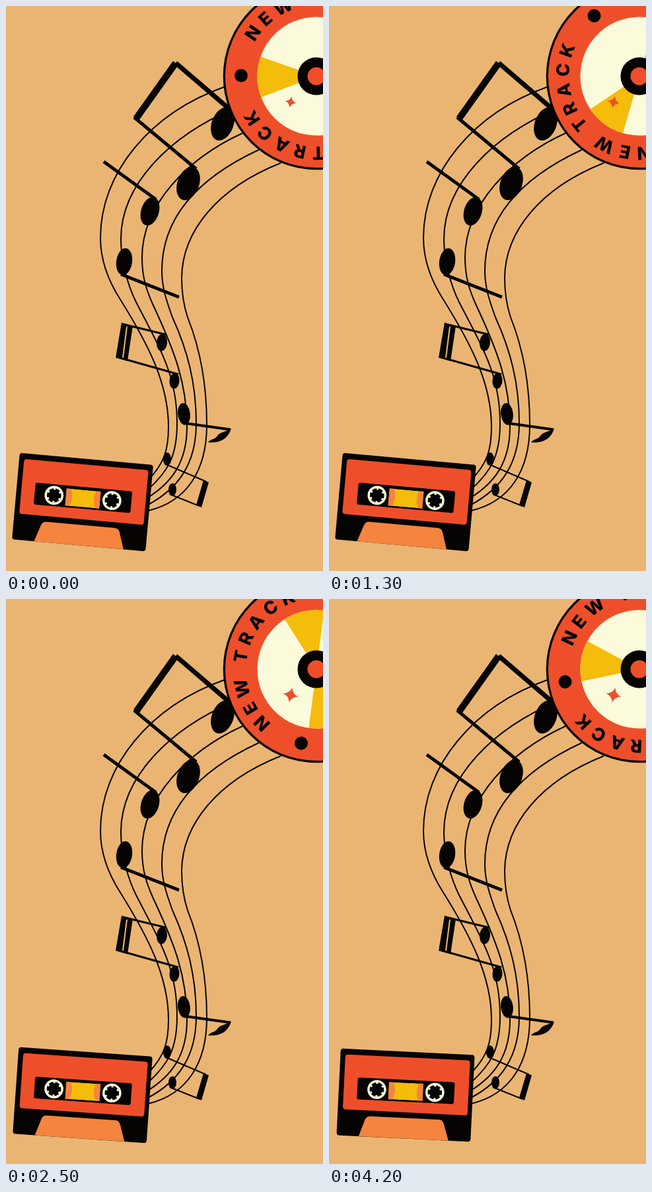
Animation of 480x853 px, one loop 4300 ms. Source, as an HTML page with a canvas:

```html
<!DOCTYPE html>
<html lang="en">
<head>
<meta charset="utf-8">
<title>New track</title>
<style>
  html, body { margin: 0; width: 100%; height: 100%; overflow: hidden; background: #eab573; }
  canvas { display: block; }
</style>
</head>
<body>
<canvas id="stage" width="480" height="853"></canvas>
<script>
const ctx = document.getElementById('stage').getContext('2d');
const SAND = '#eab573', BLACK = '#050403', RED = '#ee4f2a', CREAM = '#fbfada',
      YELLOW = '#f4bc0b', ORANGE = '#f5843f';
const TAU = Math.PI * 2, RAD = Math.PI / 180;
const LOOP = 4300, STEP = 100;

const STAFF = [
  'M331 122C218 162 143 252 143 350C143 385 155 415 173 443C215 510 246 570 246 635C246 670 240 690 215 716',
  'M345 155C250 195 174 268 174 352C174 388 186 425 197 447C235 520 259 560 259 630C259 680 245 703 215 730',
  'M358 192C275 230 206 300 206 380C206 410 213 430 223 452C255 520 274 570 274 635C274 690 250 720 215 742',
  'M383 217C290 260 236 320 236 400C236 425 243 445 252 470C275 520 288 570 288 630C288 690 262 728 215 753',
  'M416 237C320 275 267 340 266 410C266 435 269 452 275 470C295 520 304 575 304 632C304 700 275 748 215 762'
].map(d => new Path2D(d));

// x, y, rx, ry, tilt in degrees
const HEADS = [
  [328, 178, 16.5, 26, 20], [276, 268, 16.5, 26, 20], [218, 310, 13.5, 22, 17],
  [179, 386, 12, 20.5, 8], [236, 508, 8, 13, 5], [255, 566, 7.5, 12, 5],
  [269.5, 616, 9.3, 16.5, -6], [244, 684, 6, 10, 0], [252, 730, 6, 9.5, 0]
];

// line width, path
const STEMS = [
  [5, 'M194 168L288 246'], [7, 'M257 86L340 157'], [10, 'M197 170L257 86'],
  [5, 'M148 235L227 292'], [5, 'M174 405L262 439.5'],
  [3, 'M180 481L242 496'], [3, 'M172 531L261 556'],
  [4, 'M272 630L340 639.5'],
  [2, 'M240 691L303 718'], [2, 'M248 737L293 755']
].map(([w, d]) => [w, new Path2D(d)]);

const SOLIDS = new Path2D(
  'M175 478L192 483L184 536L166 531Z' +
  'M299 716L307 719L296 757L288 753Z' +
  'M341 638C336 654 324 660 306 659C310 653 316 655 320 649C324 643 332 643 337 640Z');
const BEAM_GAP = new Path2D('M183 484L177 531');

function circle(x, y, r, color) {
  ctx.fillStyle = color;
  ctx.beginPath();
  ctx.arc(x, y, r, 0, TAU);
  ctx.fill();
}

function box(x, y, w, h, r, color) {
  ctx.fillStyle = color;
  ctx.beginPath();
  ctx.roundRect(x, y, w, h, r);
  ctx.fill();
}

function stroke(path, width, color = BLACK) {
  ctx.strokeStyle = color;
  ctx.lineWidth = width;
  ctx.stroke(path);
}

function at(x, y, angle, draw) {
  ctx.save();
  ctx.translate(x, y);
  ctx.rotate(angle);
  draw();
  ctx.restore();
}

function drawMusic() {
  STAFF.forEach(line => stroke(line, 2));
  STEMS.forEach(([w, path]) => stroke(path, w));
  ctx.fillStyle = BLACK;
  ctx.fill(SOLIDS);
  stroke(BEAM_GAP, 2, SAND);
  ctx.fillStyle = BLACK;
  for (const [x, y, rx, ry, tilt] of HEADS) {
    ctx.beginPath();
    ctx.ellipse(x, y, rx, ry, tilt * RAD, 0, TAU);
    ctx.fill();
  }
}

function arcText(text, radius, spacing) {
  const widths = [...text].map(c => ctx.measureText(c).width + spacing);
  let pos = -widths.reduce((a, b) => a + b) / 2;
  [...text].forEach((c, i) => {
    at(0, 0, (pos + widths[i] / 2) / radius, () => ctx.fillText(c, 0, -radius));
    pos += widths[i];
  });
}

function drawRing() {
  ctx.font = '800 27px Inter, sans-serif';
  ctx.textAlign = 'center';
  for (const half of [0, Math.PI]) {
    at(0, 0, half, () => {
      circle(-114, 0, 10, BLACK);
      arcText('NEW TRACK', 106.5, 7.7);
    });
  }
}

function drawWedges() {
  ctx.fillStyle = YELLOW;
  for (const mid of [0, Math.PI]) {
    ctx.beginPath();
    ctx.moveTo(0, 0);
    ctx.arc(0, 0, 89.5, mid - 20 * RAD, mid + 20 * RAD);
    ctx.fill();
  }
}

function drawSparkle(n) {
  const r = 10 + 1.6 * Math.cos(TAU * (n - 8) / 17);
  ctx.fillStyle = RED;
  ctx.beginPath();
  ctx.moveTo(r, 0);
  for (let i = 1; i <= 4; i++) {
    const tip = i * TAU / 4, dip = tip - TAU / 8;
    ctx.quadraticCurveTo(r * 0.25 * Math.cos(dip), r * 0.25 * Math.sin(dip),
                         r * Math.cos(tip), r * Math.sin(tip));
  }
  ctx.fill();
}

function drawDisc(n) {
  at(470, 106, 0, () => {
    circle(0, 0, 141.3, BLACK);
    circle(0, 0, 138, RED);
    at(0, 0, (0.5 + 4.045 * n) * RAD, drawRing);
    circle(0, 0, 89.5, CREAM);
    at(0, 0, -(0.8 + 4.07 * n) * RAD, drawWedges);
    at(-39, 39, 12 * RAD, () => drawSparkle(n));
    circle(0, 0, 28.5, BLACK);
    circle(0, 0, 13.5, RED);
  });
}

function drawReel(x, y) {
  circle(x, y, 14.3, CREAM);
  circle(x, y, 10.8, BLACK);
  for (let i = 0; i < 6; i++) {
    at(x, y, i * TAU / 6, () => box(-1.5, -11.5, 3, 3, 0, CREAM));
  }
}

function drawTape() {
  ctx.save();
  ctx.beginPath();
  ctx.rect(-26, -18.5, 52, 26);
  ctx.clip();
  box(-26, -18.5, 52, 26, 0, YELLOW);
  circle(-44, -6, 27.5, ORANGE);
  circle(44, -6, 27.5, ORANGE);
  ctx.restore();
}

function drawCassette(n) {
  const tilt = 0.85 + 4.4 * Math.cos(TAU * (n - 0.45) / 13.08);
  at(116, 749, tilt * RAD, () => {
    box(-101.5, -65.5, 203, 131, 4, BLACK);
    box(-94, -57, 189, 83, 4, RED);
    box(-73.5, -23, 147, 33, 3, BLACK);
    drawTape();
    drawReel(-44, -6.3);
    drawReel(44, -6.3);
    ctx.fillStyle = ORANGE;
    ctx.fill(new Path2D('M-68 65.5L-60 41Q-58 34.5 -52 34.5H52Q58 34.5 60 41L68 65.5Z'));
  });
}

function frame(now) {
  const n = Math.floor((now % LOOP) / STEP);
  ctx.fillStyle = SAND;
  ctx.fillRect(0, 0, 480, 853);
  drawMusic();
  drawDisc(n);
  drawCassette(n);
}

const start = performance.now();
function tick() {
  frame(performance.now() - start);
  requestAnimationFrame(tick);
}
tick();
</script>
</body>
</html>
```
